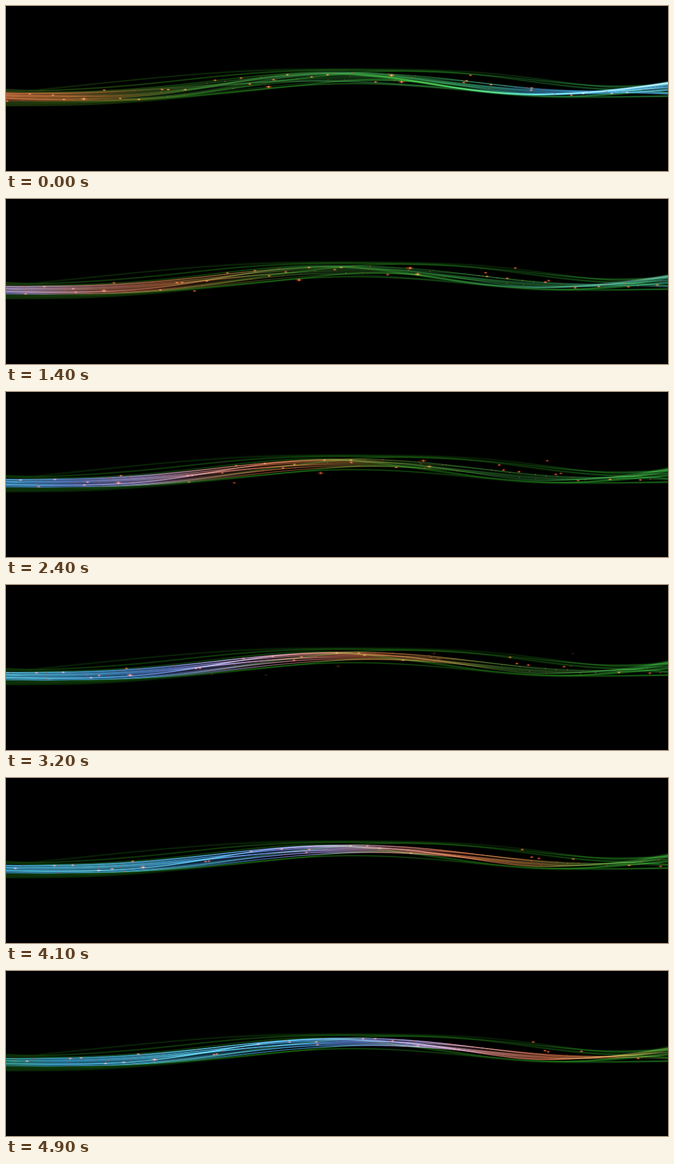
An HTML page without scripts that plays this animation: 1200x300 px, repeating every 5 s.

```html
<!DOCTYPE html>
<html lang="en">
<head>
<meta charset="utf-8">
<title>Light strands</title>
<style>
  html, body { margin: 0; width: 100%; height: 100%; overflow: hidden; background: #000; }
  svg { display: block; width: 100vw; height: 100vh; }
  .strands { fill: none; stroke-width: .9; }
  .strands use, .lights use { mix-blend-mode: screen; }
  .lights use { animation: drift 5s steps(50) infinite; }
  .lights .out { animation: drift 5s steps(50) infinite, out 5s linear infinite; }
  .dust { fill: none; stroke: #d8582c; stroke-width: 1.7; opacity: .8; }
  .dust use { animation: slide 5s steps(50) infinite; }
  .early { animation: fade 5s linear infinite; }
  @keyframes drift { to { transform: translate(var(--d), var(--h, -2px)); } }
  @keyframes slide { to { stroke-dashoffset: -115; } }
  @keyframes out { 0%, 42% { opacity: 1; } 65% { opacity: .2; } 74%, 100% { opacity: 0; } }
  @keyframes fade { 0% { opacity: 1; } 12% { opacity: .75; } 28% { opacity: .35; } 50%, 100% { opacity: 0; } }
</style>
</head>
<body>
<svg viewBox="0 0 1200 300" preserveAspectRatio="none">
  <defs>
    <!-- Colour wave that travels to the right -->
    <linearGradient id="flow" gradientUnits="userSpaceOnUse" x1="-1200" x2="1300" y1="0" y2="0">
      <stop offset=".08" stop-color="#2a9a70"/>
      <stop offset=".13" stop-color="#309cdc"/>
      <stop offset=".22" stop-color="#48c8fa"/>
      <stop offset=".3" stop-color="#3c9cf2"/>
      <stop offset=".34" stop-color="#5478e0"/>
      <stop offset=".385" stop-color="#a090e0"/>
      <stop offset=".435" stop-color="#c4706c" stop-opacity=".85"/>
      <stop offset=".48" stop-color="#d0603c" stop-opacity=".75"/>
      <stop offset=".53" stop-color="#b07434" stop-opacity=".6"/>
      <stop offset=".58" stop-color="#478a2c" stop-opacity=".42"/>
      <stop offset=".66" stop-color="#2a8a30" stop-opacity=".36"/>
      <stop offset=".77" stop-color="#2c9c38" stop-opacity=".45"/>
      <stop offset=".83" stop-color="#2f9a70" stop-opacity=".5"/>
      <stop offset=".865" stop-color="#3488c8" stop-opacity=".6"/>
      <stop offset=".92" stop-color="#48a8f0" stop-opacity=".8"/>
      <stop offset=".96" stop-color="#4aa0f0"/>
      <animateTransform attributeName="gradientTransform" type="translate" from="0 0" to="1000 0" dur="5s" repeatCount="indefinite"/>
    </linearGradient>
    <linearGradient id="green" gradientUnits="userSpaceOnUse" x1="0" x2="1200" y1="0" y2="0">
      <stop offset="0" stop-color="#1a7a10" stop-opacity=".45"/>
      <stop offset=".25" stop-color="#1a7a10" stop-opacity=".45"/>
      <stop offset=".5" stop-color="#1f8a14" stop-opacity=".5"/>
      <stop offset=".75" stop-color="#1a7a10" stop-opacity=".35"/>
      <stop offset="1" stop-color="#1f9020" stop-opacity=".8"/>
    </linearGradient>
    <linearGradient id="ends" gradientUnits="userSpaceOnUse" x1="0" x2="1200" y1="0" y2="0">
      <stop offset="0" stop-color="#d8783c"/>
      <stop offset=".17" stop-color="#b06a28" stop-opacity=".7"/>
      <stop offset=".28" stop-color="#3c8a2c" stop-opacity=".6"/>
      <stop offset=".5" stop-color="#3c9a50" stop-opacity=".7"/>
      <stop offset=".68" stop-color="#2c9a50" stop-opacity=".7"/>
      <stop offset=".8" stop-color="#2c88b0" stop-opacity=".7"/>
      <stop offset="1" stop-color="#48b0f0"/>
    </linearGradient>
    <linearGradient id="beam" gradientUnits="userSpaceOnUse" x1="600" x2="1200" y1="0" y2="0">
      <stop offset="0" stop-color="#30c020" stop-opacity="0"/>
      <stop offset=".22" stop-color="#30c020" stop-opacity=".7"/>
      <stop offset=".48" stop-color="#40e060"/>
      <stop offset=".62" stop-color="#50e0e0"/>
      <stop offset=".8" stop-color="#68c8ff"/>
      <stop offset="1" stop-color="#b0ecff"/>
    </linearGradient>
    <radialGradient id="ember">
      <stop offset="0" stop-color="#f89048"/>
      <stop offset=".3" stop-color="#d84c24" stop-opacity=".75"/>
      <stop offset="1" stop-color="#902010" stop-opacity="0"/>
    </radialGradient>

    <path id="top" d="M0 159Q40 160 80 159C330 158 420 122 620 122S910 157 1060 156Q1130 155 1200 147"/>
    <path id="mid" d="M0 165Q45 167 90 166C340 164 440 129 640 128S900 152 1050 155Q1130 157 1200 160"/>
    <path id="cross" d="M0 168Q60 170 120 169C360 168 400 124 590 124S870 161 980 161Q1090 160 1200 140"/>
    <path id="low" d="M0 171Q65 173 130 172C350 172 440 133 630 134S900 160 1030 160Q1120 159 1200 153"/>
    <path id="swoop" d="M600 122C720 124 820 160 960 161Q1060 161 1200 140"/>
    <g id="core">
      <use href="#top"/><use href="#mid"/><use href="#cross"/><use href="#low"/>
      <path d="M0 162Q50 163 100 162C330 160 430 126 610 126S880 158 1030 159Q1120 158 1200 142"/>
      <path d="M0 163Q30 165 60 164C310 165 400 134 600 131S900 158 1050 158Q1130 156 1200 144"/>
      <path d="M0 173Q75 174 150 172C380 170 470 136 660 135S890 161 1000 161Q1110 158 1200 141"/>
    </g>
    <g id="halo">
      <path d="M0 152Q60 156 120 152C320 142 400 116 600 116S870 125 960 135S1090 150 1200 142"/>
      <path d="M60 153C200 138 380 116 520 115S760 114 850 120S1050 148 1110 149Q1150 149 1200 138" opacity=".6"/>
      <path d="M0 181Q60 181 120 180C330 174 470 142 620 141S890 166 1020 166Q1110 166 1200 164"/>
      <path d="M0 178Q80 178 150 176C350 168 420 145 520 133S660 116 760 118S960 142 1060 150Q1130 154 1200 158"/>
      <path d="M0 155Q60 158 140 156C330 150 430 122 560 121S840 165 1000 165Q1100 165 1200 140"/>
      <path d="M0 175Q80 176 160 174C370 166 470 150 600 137S800 150 900 160S1080 165 1200 150"/>
    </g>
    <!-- Strands that pinch together at the crest -->
    <g id="twist">
      <path d="M0 164Q100 168 200 165C360 160 440 121 590 120S850 161 970 161Q1080 161 1200 139"/>
      <path d="M0 161Q90 166 190 164C340 160 450 125 580 122S800 158 940 160Q1060 161 1200 141"/>
      <path d="M0 167Q110 174 240 170C380 164 470 124 600 121S820 150 980 154Q1100 156 1200 159"/>
      <path d="M0 158Q80 162 200 156C340 149 440 136 560 136S800 150 930 159Q1060 163 1200 153"/>
    </g>

    <g id="spark">
      <ellipse rx="4.5" ry="2.2" fill="url(#ember)"/>
      <ellipse rx="1.1" ry=".8" fill="#f08a48"/>
    </g>
    <g id="flare">
      <ellipse rx="7.5" ry="2.8" fill="url(#ember)"/>
      <ellipse rx="1.6" ry="4.5" fill="url(#ember)"/>
      <ellipse rx="1.7" ry="1.1" fill="#f89850"/>
    </g>
  </defs>

  <rect width="1200" height="300"/>

  <path fill="url(#flow)" opacity=".28" d="M0 159Q40 160 80 159C330 158 420 122 620 122S910 157 1060 156Q1130 155 1200 147V153Q1120 159 1030 160C900 160 790 134 630 134S350 172 130 172Q65 173 0 171Z"/>

  <g class="strands">
    <g stroke="url(#green)">
      <use href="#halo" stroke-width="5" opacity=".22"/>
      <use href="#halo" opacity=".75"/>
      <use href="#halo" transform="matrix(1.03 0 0 .94 -20 8.8)" opacity=".6"/>
      <use href="#halo" transform="matrix(1.02 0 0 .97 -8 4.6)" opacity=".5"/>
    </g>
    <g stroke="url(#flow)">
      <use href="#core" opacity=".9"/>
      <use href="#core" transform="matrix(1.03 0 0 .92 -20 11.8)" opacity=".65"/>
      <use href="#cross" stroke-width="1.7" opacity=".8"/>
      <use href="#top" stroke-width="1.3" opacity=".7"/>
    </g>
    <g class="early" stroke="url(#ends)">
      <use href="#halo" opacity=".3"/>
      <use href="#twist" stroke-width="5" opacity=".25"/>
      <use href="#twist" opacity=".65"/>
      <use href="#twist" transform="matrix(1.03 0 0 .93 -20 10)" opacity=".45"/>
      <g stroke="url(#beam)">
        <use href="#swoop" stroke-width="4" opacity=".4"/>
        <use href="#swoop" stroke-width="1.8"/>
      </g>
    </g>
  </g>

  <g class="dust">
    <use href="#top" stroke-dasharray="2 47 1 83 1.5 31 2 64"/>
    <use href="#mid" stroke-dasharray="1 71 2 38 1.5 95"/>
    <use href="#low" stroke-dasharray="1.5 29 1 88 2 57 1 113"/>
  </g>

  <g class="lights">
    <use href="#flare" class="out" x="699" y="126" style="--d:120px"/>
    <use href="#flare" class="out" x="476" y="147" style="--d:197px;--h:1px"/>
    <use href="#flare" class="out" x="717" y="138" style="--d:105px;--h:-5px"/>
    <use href="#flare" x="141" y="169" style="--d:131px;--h:-8px"/>
    <use href="#spark" class="out" x="241" y="170" style="--d:360px;--h:-10px"/>
    <use href="#spark" class="out" x="207" y="168" style="--d:260px;--h:-9px"/>
    <use href="#spark" class="out" x="842" y="126" style="--d:290px"/>
    <use href="#spark" class="out" x="325" y="152" style="--d:140px;--h:-10px"/>
    <use href="#spark" x="835" y="136" style="--d:123px;--h:-7px"/>
    <use href="#spark" x="952" y="153" style="--d:93px;--h:-7px"/>
    <use href="#spark" x="283" y="152" style="--d:96px;--h:0px"/>
    <use href="#spark" x="294" y="152" style="--d:90px;--h:-1px"/>
    <use href="#spark" x="85" y="162" style="--d:131px;--h:4px"/>
    <use href="#spark" x="-60" y="161" style="--d:180px"/>
    <use href="#spark" x="43" y="160" style="--d:95px"/>
    <use href="#spark" x="178" y="153" style="--d:63px"/>
    <use href="#spark" x="426" y="131" style="--d:90px"/>
    <use href="#spark" x="379" y="135" style="--d:80px"/>
    <use href="#spark" x="442" y="142" style="--d:125px;--h:-8px"/>
    <use href="#spark" x="485" y="134" style="--d:79px;--h:-5px"/>
    <use href="#spark" x="510" y="125" style="--d:140px"/>
    <use href="#spark" x="583" y="125" style="--d:88px"/>
    <use href="#spark" x="554" y="129" style="--d:150px"/>
    <use href="#spark" x="670" y="138" style="--d:78px"/>
    <use href="#spark" x="830" y="139" style="--d:150px;--h:6px"/>
    <use href="#spark" x="879" y="143" style="--d:106px;--h:4px"/>
    <use href="#spark" class="out" x="953" y="149" style="--d:110px"/>
    <use href="#spark" class="out" x="1025" y="162" style="--d:25px"/>
    <use href="#spark" x="1046" y="159" style="--d:102px;--h:0px"/>
    <use href="#spark" x="1126" y="157" style="--d:195px"/>
    <use href="#spark" x="1098" y="159" style="--d:108px;--h:2px"/>
    <use href="#spark" class="out" x="2" y="173" style="--d:120px"/>
    <use href="#spark" x="-92" y="166" style="--d:133px"/>
    <use href="#spark" x="105" y="170" style="--d:77px"/>
  </g>
</svg>
</body>
</html>
```
